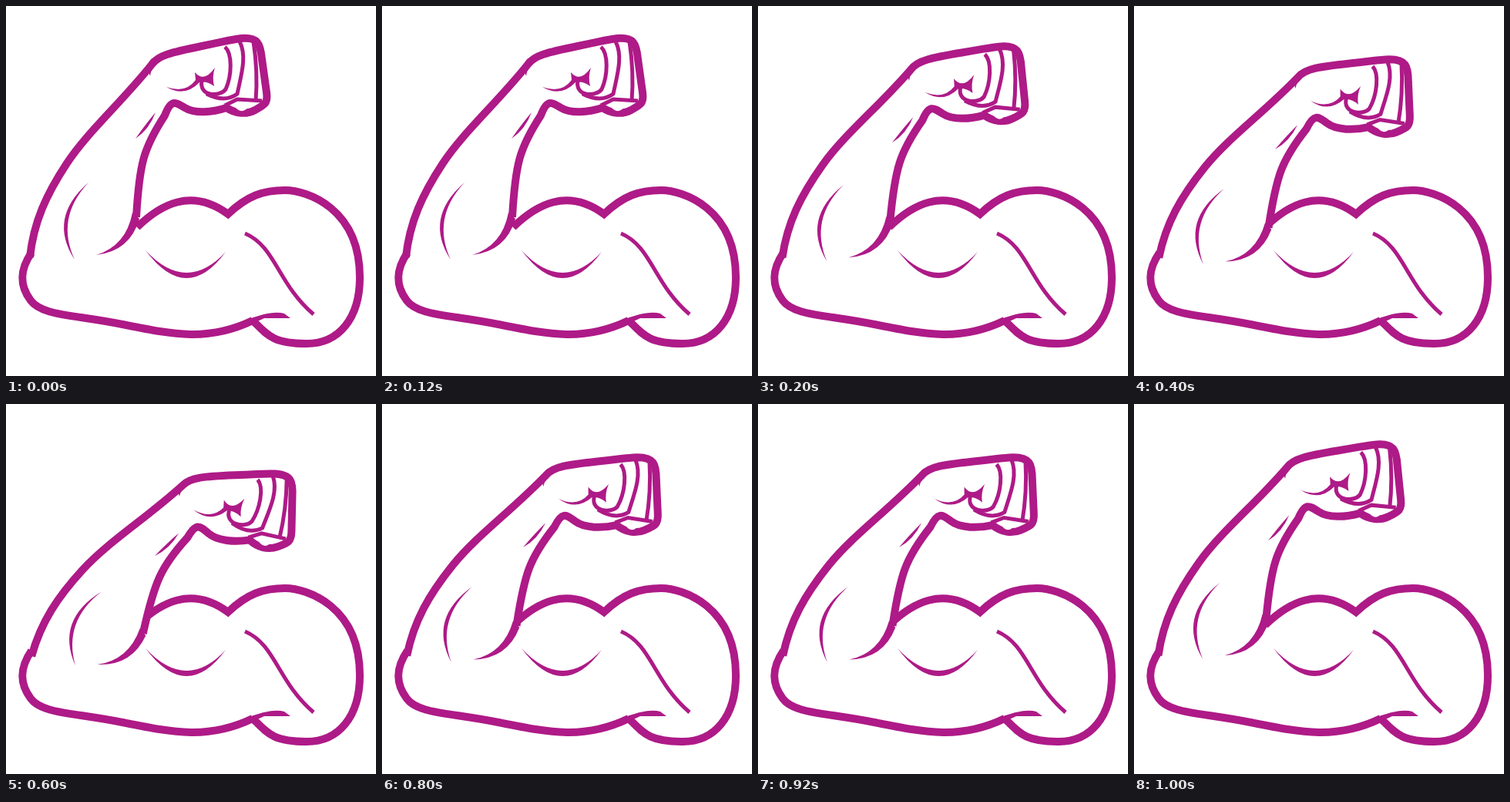
Write an HTML page that moves like this. It is 480x480 px and loops after 1200 ms.

```html
<!DOCTYPE html>
<html lang="en">
<head>
<meta charset="utf-8">
<title>Flexing arm</title>
<style>
  html, body { margin: 0; width: 100%; height: 100%; overflow: hidden; background: #fff; }
  svg { display: block; width: 100%; height: 100%; fill: #ae1a87; }
  .line { fill: none; stroke: #ae1a87; stroke-width: 10; }
  .thin { stroke-width: 5; }
  .paper { fill: #fff; }
</style>
</head>
<body>
<svg viewBox="0 0 480 480">
  <!-- Biceps and shoulder -->
  <path class="line" d="M170,287 C200,258 240,235 288,270 C313,246 334,239 362,239
    S459,262 459,352 C459,405 432,438 390,438 S340,428 322,410"/>
  <path d="M181,317 Q234,388 285,319 Q234,374 181,317"/>
  <path class="line thin" d="M310,295 C350,312 352,360 399,400"/>
  <path d="M308,409 Q344,394 361,399 L369,405 H335 L318,413"/>

  <g id="forearm">
    <path class="line paper" d="M31,326 C36,280 52,245 79,204 S150,125 189,76
      C197,64 215,60 254,52 S290,44 305,42 C326,40 330,48 332,69 L338,112
      C340,126 336,128 323,135 C312,141 298,140 286,132 C268,138 245,140 232,132
      S214,121 206,142 C178,185 173,205 169,274"/>
    <path d="M164,268 L173,276 Q161,318 117,323 Q156,311 164,268"/>
    <path d="M183,80 L187,91 Q188,80 198,70"/>
    <path d="M194,138 Q186,160 168,172 Q182,152 194,138"/>
    <path d="M107,229 Q54,275 89,329 Q64,275 107,229"/>

    <!-- Fingers, thumb crease and thumb tip -->
    <path class="line thin" d="M284,53 C294,62 293,90 285,108 C278,118 250,118 254,97"/>
    <path class="line thin" d="M303,46 C313,65 305,90 300,114 Q284,126 260,114"/>
    <path class="line thin" d="M321,46 Q327,85 324,124"/>
    <path class="line thin" d="M284,129 L300,121 L332,123"/>
    <path d="M208,105 Q233,114 246,96 L245,86 Q257,100 271,80 Q267,92 270,104
      Q260,97 251,99 Q232,119 208,105"/>
    <path class="paper" d="M294,127 L317,126 Q307,146 294,127"/>
  </g>

  <!-- Elbow and underside -->
  <path class="line" d="M33,320 C18,342 17,362 32,382 S86,400 151,413 S262,436 320,408"/>
</svg>
<script>
const forearm = document.getElementById('forearm');
const start = performance.now();

// The forearm sinks in three growing steps, then rises the same way.
function tick() {
  const step = Math.floor((performance.now() - start) / 200) % 6;
  const bend = Math.min(step, 6 - step) / 3;
  forearm.setAttribute('transform', `rotate(${9.2 * bend ** 1.35} 25 340)`);
  requestAnimationFrame(tick);
}
tick();
</script>
</body>
</html>
```
